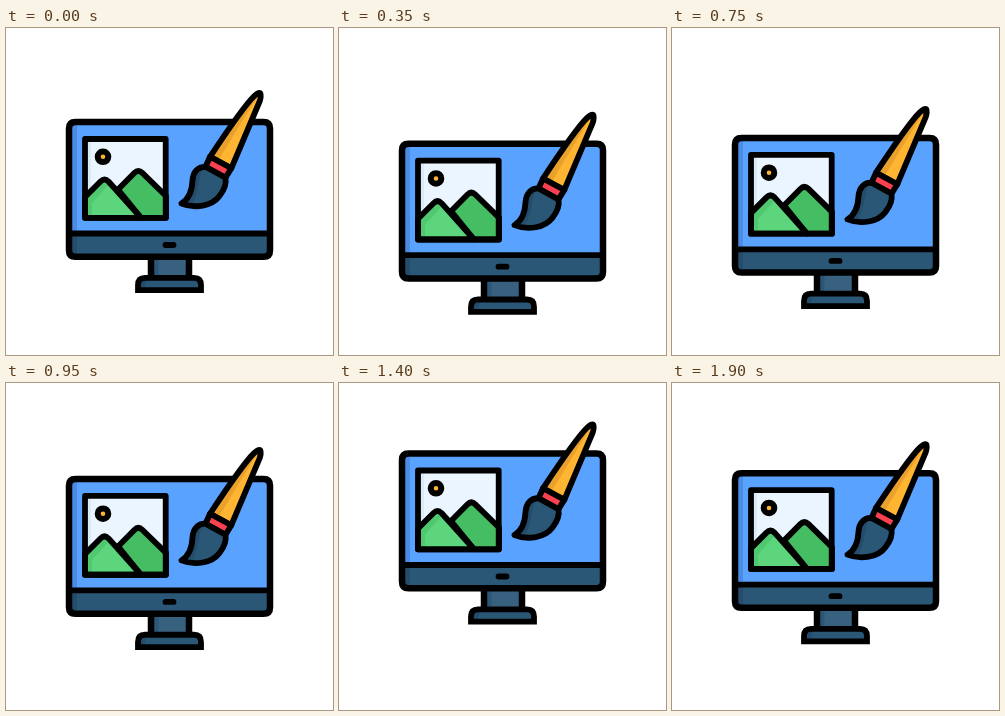
Write an HTML page that moves like this. It is 327 px wide and 327 px high and loops after 1950 ms.

```html
<!DOCTYPE html>
<html lang="en">
<head>
<meta charset="utf-8">
<title>Design monitor</title>
<style>
  html, body { margin: 0; width: 100%; height: 100%; overflow: hidden; background: #fff; }
  svg { display: block; width: 100vw; height: 100vh; }
  .line { fill: none; stroke: #000; stroke-width: 5.8; stroke-linecap: round; stroke-linejoin: round; }
  .outer { stroke-width: 6.5; }
  .square { stroke-linejoin: miter; }
  .navy { fill: #2b5777; }
  .shade { fill: #254d6b; }
</style>
</head>
<body>
<svg viewBox="0 0 327 327">
  <defs>
    <path id="case" d="M69.500 94H257.500Q264 94 264 100.500V222.200Q264 228.700 257.500 228.700H69.500Q63 228.700 63 222.200V100.500Q63 94 69.500 94Z"/>
    <path id="base" d="M132 262.200V257Q132 249.800 139 249.800H188Q195 249.800 195 257V262.200Z"/>
    <path id="hillLeft" d="M79 169L94.500 153.500Q98.500 149.500 102.500 153.500L135 189.800H79Z"/>
    <path id="hillRight" d="M112 161.500L128.300 145Q132.300 141 136.300 144.800L160 168V189.800H135Z"/>
    <path id="handle" d="M204 128.800Q237 79 247.800 68.500Q252.500 64 254.300 65.200Q255.300 68 253.800 73L225.300 140.300Z"/>
    <path id="ferrule" d="M204 128.800L225.300 140.300L219.500 149.800L199.500 138.800Z"/>
    <path id="bristles" d="M199.500 138.800C192 138.500 187 144 186.500 152.500C186 164 183 171 175.500 175.500C189 181 206 178 213.500 168C219 161 220.500 155 219.500 149.800Z"/>
    <clipPath id="caseClip"><use href="#case"/></clipPath>
    <clipPath id="bristleClip"><use href="#bristles"/></clipPath>
    <clipPath id="hillClip"><use href="#hillLeft"/></clipPath>
  </defs>

  <g id="icon">
    <!-- stand -->
    <rect x="144.500" y="228" width="38.500" height="22" fill="#386180"/>
    <rect class="navy" x="144.500" y="228" width="8" height="22"/>
    <path class="line outer" d="M145 229V249M183 229V249"/>
    <use href="#base" class="navy"/>
    <path class="shade" d="M132 262V257Q132 250 139 250H142Q139 255 139 262Z"/>
    <use href="#base" class="line square"/>

    <!-- monitor -->
    <g clip-path="url(#caseClip)">
      <rect x="60" y="90" width="207" height="116" fill="#5aa2ff"/>
      <rect x="60" y="90" width="11" height="116" fill="#4a8ce4"/>
      <rect class="navy" x="60" y="205" width="207" height="27"/>
      <rect class="shade" x="60" y="205" width="11" height="27"/>
    </g>
    <path class="line" d="M63 205.500H264M159.500 217H167.500"/>
    <use href="#case" class="line outer"/>

    <!-- picture -->
    <rect x="79" y="111" width="80.700" height="78.800" fill="#eaf5ff"/>
    <rect x="79" y="111" width="6" height="78.800" fill="#d9eafa"/>
    <use href="#hillRight" fill="#45bd62"/>
    <use href="#hillRight" class="line"/>
    <use href="#hillLeft" fill="#5dd57d"/>
    <path d="M79 165L98 148L105 154L86 175V190H79Z" fill="#4fc870" clip-path="url(#hillClip)"/>
    <use href="#hillLeft" class="line"/>
    <rect class="line" x="79" y="111" width="80.700" height="78.800"/>
    <circle cx="97" cy="128.800" r="5.300" fill="#ffb531" stroke="#000" stroke-width="6"/>

    <!-- brush -->
    <use href="#handle" fill="#ffb531"/>
    <path d="M204 128.800Q237 79 247.800 68.500L252 67L212 133.100Z" fill="#e9a12c"/>
    <use href="#handle" class="line"/>
    <use href="#ferrule" fill="#f9414f"/>
    <use href="#ferrule" class="line"/>
    <use href="#bristles" class="navy"/>
    <path class="shade" clip-path="url(#bristleClip)" d="M184 138H198C192 146 195 163 184 179H172Z"/>
    <use href="#bristles" class="line"/>
  </g>
</svg>
<script>
  const LOOP = 1950, STEP = 50, SWING = 24;
  const icon = document.getElementById("icon");
  const start = performance.now();

  function draw(now) {
    const time = Math.max(0, now - start) % LOOP;
    const held = Math.floor(time / STEP) * STEP;
    const y = SWING * Math.sin(2 * Math.PI * held / LOOP);
    icon.setAttribute("transform", `translate(0 ${y.toFixed(3)})`);
    requestAnimationFrame(draw);
  }
  draw(start);
</script>
</body>
</html>
```
